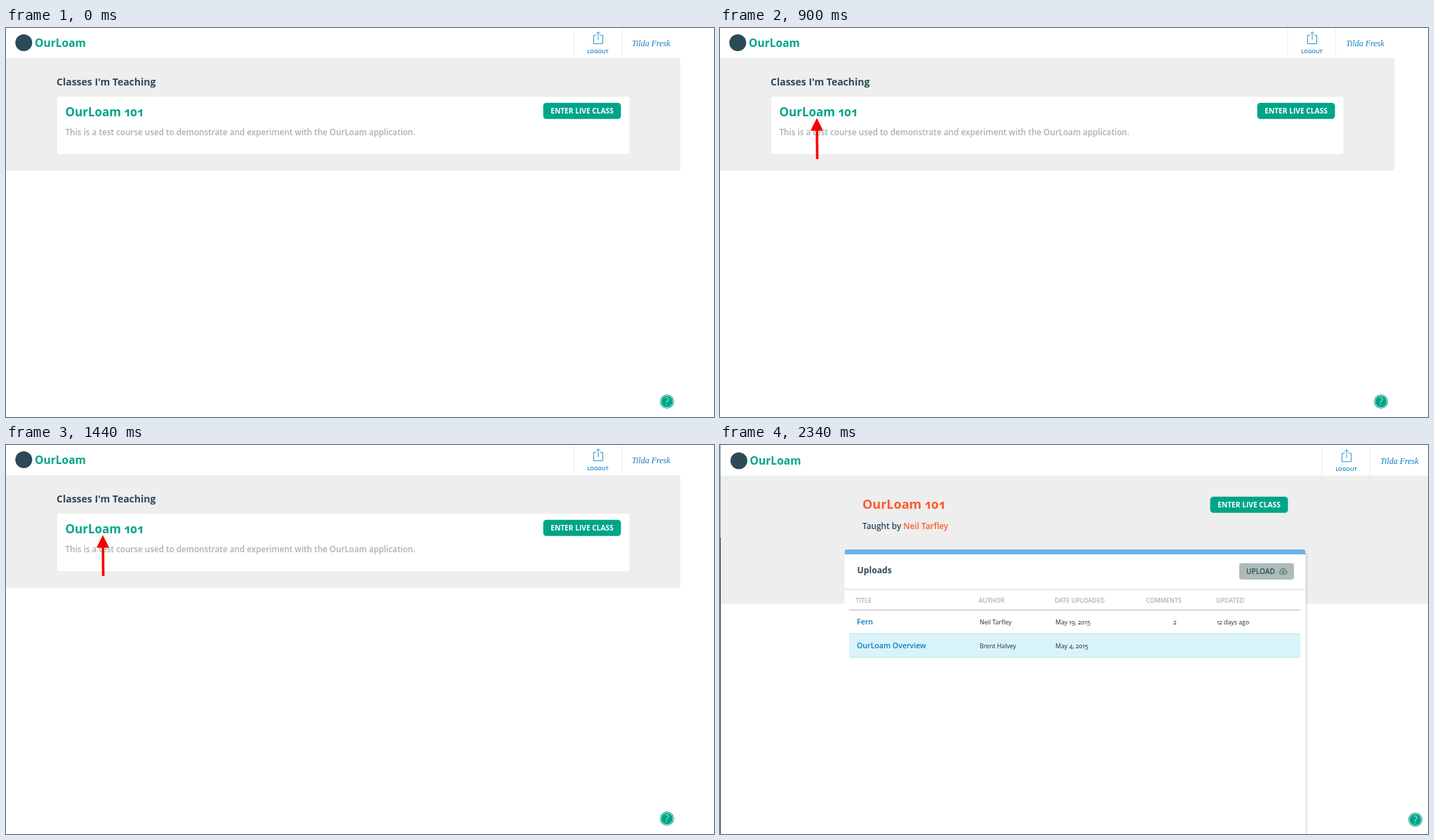
Animation of 1009 by 555 pixels, one loop 2700 ms. Source, as an HTML page:

```html
<!DOCTYPE html>
<html lang="en">
<head>
<meta charset="utf-8">
<title>Class pages</title>
<style>
  html, body { margin: 0; width: 100%; height: 100%; overflow: hidden; background: #fff; }
  svg { display: block; width: 1009px; height: 555px; font-family: "Open Sans", "Noto Sans", sans-serif; font-variant-numeric: oldstyle-nums proportional-nums; }
  .bold { font-weight: 700; }
  .semi { font-weight: 600; }
  .teal { fill: #00a488; }
  .ink { fill: #2c4a57; }
  .blue { fill: #0b7bbd; }
  .orange { fill: #ff5a2b; }
  .muted { fill: #a5b3ae; }
  .user { font: italic 12px "Liberation Serif", "Noto Serif", serif; }
  .head { font-size: 8.9px; font-weight: 600; }
  .cell { font-size: 8.8px; font-weight: 500; fill: #1d2f38; }
  .link { font-size: 10.6px; font-weight: 600; }
  .line { fill: none; stroke: #2f93cf; }

  /* Three equal steps of 900 ms: list, list with arrow, class page */
  #list, #arrow, #course { animation: 2700ms step-end infinite; }
  #list { animation-name: list; }
  #arrow { animation-name: arrow; }
  #course { animation-name: course; }
  @keyframes list { 0% { visibility: visible; } 66.6667%, 100% { visibility: hidden; } }
  @keyframes arrow { 0% { visibility: hidden; } 33.3333% { visibility: visible; } 66.6667%, 100% { visibility: hidden; } }
  @keyframes course { 0% { visibility: hidden; } 66.6667%, 100% { visibility: visible; } }
</style>
</head>
<body>
<svg viewBox="0 0 1009 555">
  <defs>
    <g id="brand">
      <circle cx="25.3" cy="21" r="12" class="ink"/>
      <text x="41" y="27" font-size="15.6" class="bold teal">OurLoam</text>
    </g>
    <g id="account">
      <path d="M809 0V43M877.5 0V43" stroke="#ececec"/>
      <path d="M841 10.5H837.5V22.5H850.5V10.5H847M844 17V5.5M841 8.5L844 5.5L847 8.5" class="line"/>
      <text x="843.5" y="35.7" font-size="7.4" text-anchor="middle" class="semi blue">LOGOUT</text>
      <text x="892" y="26" class="user blue">Tilda Fresk</text>
    </g>
    <g id="enter">
      <rect x="765.6" y="106.7" width="110.8" height="23" rx="4.5" class="teal"/>
      <text x="821" y="122" font-size="10.2" text-anchor="middle" fill="#fff" class="bold">ENTER LIVE CLASS</text>
    </g>
    <g id="help">
      <circle cx="942" cy="533" r="10" class="teal"/>
      <circle cx="942" cy="533" r="8.6" fill="none" stroke="#fff" stroke-width=".8"/>
      <text x="942" y="538.2" font-size="15" font-weight="300" text-anchor="middle" fill="#fff">?</text>
    </g>
    <linearGradient id="fall" x2="0" y2="1">
      <stop stop-color="#dcdcdc"/><stop offset="1" stop-color="#fff"/>
    </linearGradient>
    <linearGradient id="side">
      <stop stop-color="#000" stop-opacity=".14"/><stop offset="1" stop-color="#000" stop-opacity="0"/>
    </linearGradient>
  </defs>

  <g id="list">
    <rect y="43" width="961" height="160.5" fill="#eee"/>
    <use href="#brand"/>
    <use href="#account"/>
    <text x="72" y="82.3" font-size="14" class="bold ink">Classes I'm Teaching</text>
    <rect x="73" y="98" width="815.5" height="82" rx="4" fill="#fff"/>
    <text x="84.5" y="125.5" font-size="17" class="bold teal">OurLoam 101</text>
    <text x="84.5" y="153.4" font-size="11.7" class="semi muted">This is a test course used to demonstrate and experiment with the OurLoam application.</text>
    <use href="#enter"/>
    <use href="#help"/>
  </g>

  <path id="arrow" d="M138 128.5L147 146.5H140L140.4 187H136.8L136.4 146.5H129Z" fill="#f50000"/>

  <g id="course">
    <rect y="44" width="1009" height="182.6" fill="#eee"/>
    <path d="M0 44.5H1009" stroke="#eaeaea"/>
    <path d="M.5 0V132" stroke="#8ba3b5"/>
    <path d="M.5 132V555" stroke="#3a3a3a"/>
    <use href="#brand" x="1.6" y="1.4"/>
    <use href="#account" x="49" y="1.3"/>
    <text x="203" y="91" font-size="18" class="bold orange">OurLoam 101</text>
    <text x="203" y="119.8" font-size="11.8" class="semi ink">Taught by <tspan class="orange">Neil Tarfley</tspan></text>
    <use href="#enter" x="-67" y="-33"/>

    <rect x="834.5" y="154" width="4" height="401" fill="url(#side)"/>
    <rect x="177.5" y="153" width="657" height="402" fill="#fff"/>
    <path d="M177.5 156V153Q177.5 149 181.5 149H830.5Q834.5 149 834.5 153V156Z" fill="#6ab4e6"/>
    <text x="195.5" y="182.6" font-size="12.2" class="bold ink">Uploads</text>
    <rect x="740" y="168.5" width="78" height="23.5" rx="4" fill="#adbbb7"/>
    <text x="750" y="184.4" font-size="10.1" class="semi ink">UPLOAD</text>
    <path d="M801 183.5H799.8C796.7 183.5 796.8 179.7 799.5 179.5C800 175.2 805.6 175.3 806 179.5C808.8 179.8 808.6 183.5 805.8 183.5H804.6M802.8 185.5V179.5M801 181.3L802.8 179.5L804.6 181.3" fill="none" stroke="#2c4a57" stroke-width=".9"/>
    <rect x="177.5" y="205" width="657" height="3" fill="url(#fall)"/>

    <g class="head muted">
      <text x="193.5" y="224.6">TITLE</text>
      <text x="368.5" y="224.6">AUTHOR</text>
      <text x="477" y="224.6">DATE UPLOADED</text>
      <text x="607" y="224.6">COMMENTS</text>
      <text x="707" y="224.6">UPDATED</text>
    </g>
    <path d="M184 235.5H827" stroke="#b4b8b8"/>
    <rect x="184" y="269" width="643" height="34" fill="#d9f3fb"/>
    <path d="M184 269H827M184 303H827" stroke="#c3e2ea"/>
    <g class="link blue">
      <text x="195" y="256">Fern</text>
      <text x="195" y="289.8">OurLoam Overview</text>
    </g>
    <g class="cell">
      <text x="370" y="256">Neil Tarfley</text>
      <text x="478" y="256">May 19, 2015</text>
      <text x="646" y="256">2</text>
      <text x="708" y="256">12 days ago</text>
      <text x="370" y="289.8">Brent Halvey</text>
      <text x="478" y="289.8">May 4, 2015</text>
    </g>
    <use href="#help" x="49" y="1.5"/>
  </g>
</svg>
</body>
</html>
```
